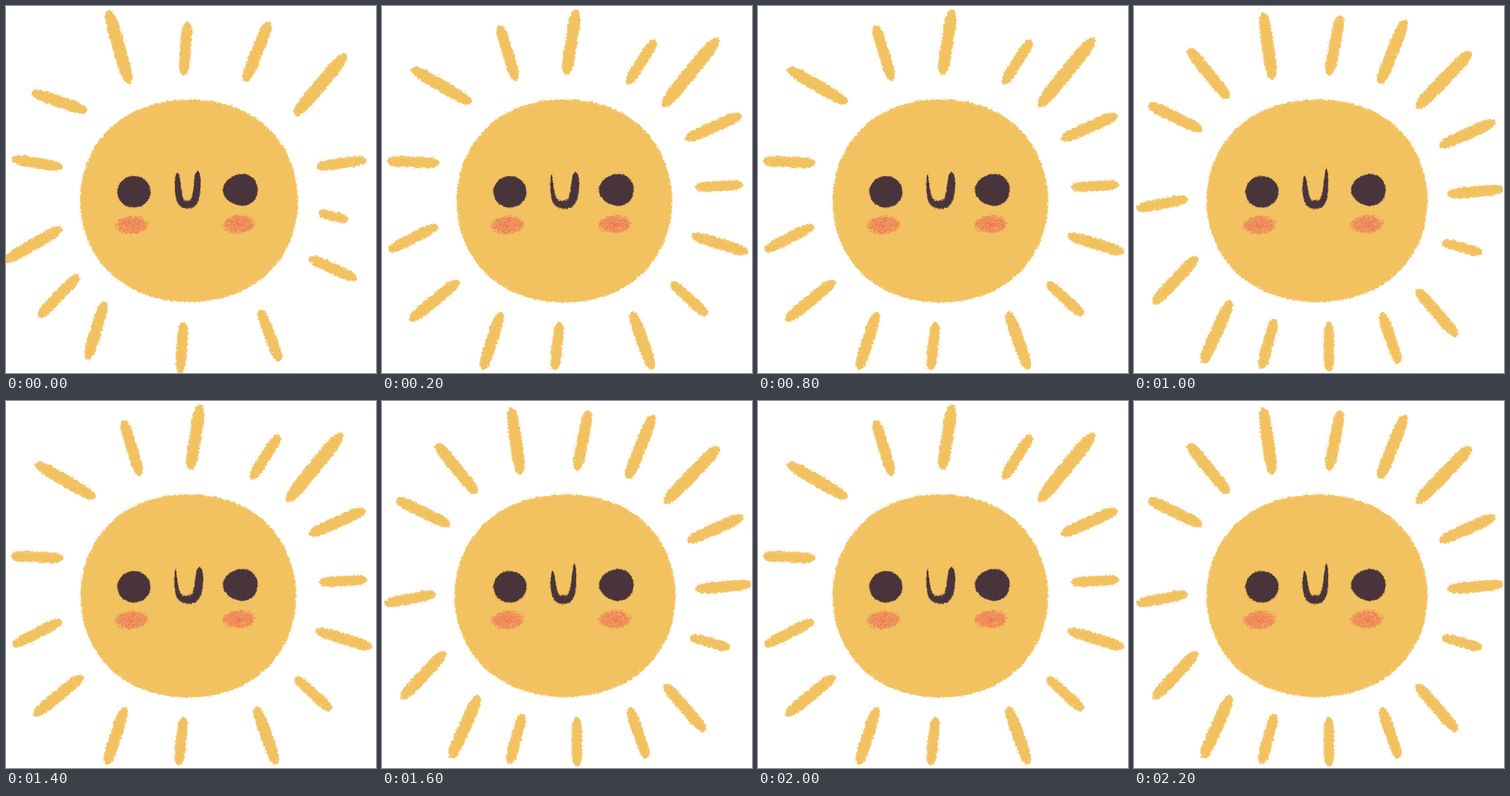
An HTML page with a canvas that plays this animation: 480 px wide and 476 px high, repeating every 2.4 s.

```html
<!DOCTYPE html>
<html lang="en">
<head>
<meta charset="utf-8">
<title>Wobbly sun</title>
<style>
html, body { margin: 0; width: 100%; height: 100%; overflow: hidden; background: #fff; }
canvas { display: block; width: 100vw; height: 100vh; }
</style>
</head>
<body>
<canvas id="stage" width="480" height="476"></canvas>
<script>
const W = 480, H = 476, CX = 236, CY = 250, HOLD = 200;
const PAPER = '#fff', YELLOW = '#f2c260', DARK = '#48343a', CORAL = '#f06c5a';
const { sin, cos, sqrt, hypot, abs, PI } = Math;
const rad = deg => deg * PI / 180;

let seed = 7;
function rand() {
  seed = (seed * 1664525 + 1013904223) % 4294967296;
  return seed / 4294967296;
}
const spread = a => (rand() * 2 - 1) * a;

// n + 1 points of a path given as a function of 0..1
const sample = (n, path) => Array.from({ length: n + 1 }, (_, i) => path(i / n));

// Fill an outline with a crumbly crayon edge
function crayon(g, edge, color, under, amp) {
  g.fillStyle = color;
  g.beginPath();
  for (const [x, y] of edge) g.lineTo(x + spread(amp), y + spread(amp));
  g.fill();
  for (const [x, y] of edge) {
    g.fillStyle = rand() < 0.5 ? color : under;
    g.globalAlpha = 0.3 + rand() * 0.5;
    g.fillRect(x + spread(amp * 2) - 0.5, y + spread(amp * 2) - 0.5, 1, 1);
  }
  g.globalAlpha = 1;
}

// Stroke along path(t) = [x, y, width]; a higher cap gives blunter ends
function brush(g, n, path, cap, color, under, amp) {
  const left = [], right = [];
  sample(n, t => {
    const [x, y, w] = path(t), [x2, y2] = path(t + 0.001), [x1, y1] = path(t - 0.001);
    const len = hypot(x2 - x1, y2 - y1);
    const h = w / 2 * sqrt(1 - abs(2 * t - 1) ** cap);
    const nx = (y1 - y2) / len * h, ny = (x2 - x1) / len * h;
    left.push([x + nx, y + ny]);
    right.unshift([x - nx, y - ny]);
  });
  crayon(g, left.concat(right), color, under, amp);
}

// Rays start on a ring around the disc; longer ones are drawn thicker
function ray(g, at, dir, len) {
  const a = rad(at), d = rad(dir);
  const r = 169 + 2 * cos(a) + 4 * cos(2 * a) - 5 * cos(4 * a);
  const path = t => [
    CX + r * cos(a) + t * len * cos(d),
    CY + r * sin(a) + t * len * sin(d),
    8.5 + len * 0.08
  ];
  brush(g, Math.round(len), path, 5, YELLOW, PAPER, 1.2);
}

function disc(g, size, stretch, lean) {
  const edge = sample(800, t => {
    const a = t * 2 * PI;
    const r = size + stretch * cos(2 * a) + 3 * cos(a - rad(lean)) - 1.2 * cos(4 * a);
    return [CX + r * cos(a), CY + r * sin(a)];
  });
  crayon(g, edge, YELLOW, PAPER, 1.1);
}

// Oval, optionally fuller on its right side
const oval = (cx, cy, rx, ry, egg = 0) => sample(120, t => {
  const a = t * 2 * PI;
  return [cx + rx * cos(a), cy + ry * sin(a) * (1 + egg * cos(a))];
});

// U-shaped smile with its own height and thickness at each tip
function smile(g, { half, leftTop, rightTop, thick: [w0, w1, w2] }) {
  const low = 257.5;
  const path = t => {
    const u = 2 * t - 1, side = abs(u);
    const top = u < 0 ? leftTop : rightTop;
    return [
      235.5 + half * sin(u * PI / 2),
      low - (low - top) * side ** 3,
      w1 + ((u < 0 ? w0 : w2) - w1) * side
    ];
  };
  brush(g, 100, path, 14, DARK, YELLOW, 0.4);
}

function cheek(g, cx, cy) {
  const rx = 22, ry = 12.5, tilt = -0.08;
  g.fillStyle = CORAL;
  g.globalAlpha = 0.5;
  g.beginPath();
  for (const [x, y] of oval(cx, cy, rx - 3, ry - 2)) g.lineTo(x + spread(2), y + spread(1.5));
  g.fill();
  for (let i = 0; i < 600; i++) {
    const a = rand() * 2 * PI, r = rand() ** 0.6;
    const x = r * rx * cos(a), y = r * ry * sin(a);
    g.fillStyle = rand() < 0.85 - r * 0.25 ? CORAL : YELLOW;
    g.globalAlpha = 0.25 + rand() * 0.35;
    g.fillRect(cx + x - 0.8, cy + y + x * tilt - 0.5, 1.6, 1);
  }
  g.globalAlpha = 1;
}

// Each ray: angle of its foot, direction, length
const poses = [
  {
    rays: [
      [-117, -106, 100], [-92, -86, 70], [-64, -68, 85], [-38, -50, 104], [-14, -8, 66],
      [6, 14, 40], [26, 24, 68], [57, 69, 72], [92, 94, 66], [129, 107, 79],
      [145, 134, 76], [167, 150, 87], [194, 190, 67], [221, 199, 77]
    ],
    disc: [137.5, 5, 60],
    smile: { half: 13, leftTop: 216, rightTop: 213, thick: [8, 10, 9] }
  },
  {
    rays: [
      [-112, -107, 75], [-89, -81, 87], [-61, -58, 68], [-43, -51, 114], [-26, -24, 80],
      [-5, -3, 63], [16, 17, 76], [38, 42, 64], [59, 70, 80], [92, 96, 63],
      [119, 108, 79], [142, 141, 82], [168, 153, 71], [196, 182, 68], [226, 210, 90]
    ],
    disc: [137, 4, 80],
    smile: { half: 15.5, leftTop: 218, rightTop: 215, thick: [3, 11, 11] }
  },
  {
    rays: [
      [-110, -98, 88], [-84, -79, 79], [-61, -68, 90], [-42, -46, 102], [-23, -24, 80],
      [-2, -5, 74], [19, 15, 54], [42, 49, 80], [60, 71, 70], [84, 90, 64],
      [109, 105, 68], [130, 114, 90], [154, 133, 85], [180, 169, 68], [211, 206, 78],
      [229, 231, 84]
    ],
    disc: [138.5, 6, 60],
    smile: { half: 14, leftTop: 220, rightTop: 210, thick: [6, 12, 5] }
  }
];

function paint(pose) {
  const c = document.createElement('canvas');
  c.width = W;
  c.height = H;
  const g = c.getContext('2d');
  g.fillStyle = PAPER;
  g.fillRect(0, 0, W, H);
  pose.rays.forEach(r => ray(g, ...r));
  disc(g, ...pose.disc);
  crayon(g, oval(166, 241, 21.5, 20.5), DARK, YELLOW, 0.4);
  crayon(g, oval(304, 238.5, 22.5, 20.5, 0.12), DARK, YELLOW, 0.4);
  smile(g, pose.smile);
  cheek(g, 163, 284);
  cheek(g, 302, 283);
  return c;
}

const cels = poses.map(paint);
const ctx = document.getElementById('stage').getContext('2d');
const start = performance.now();

function draw() {
  const t = Math.max(0, performance.now() - start);
  ctx.drawImage(cels[Math.floor(t / HOLD) % cels.length], 0, 0);
  requestAnimationFrame(draw);
}
draw();
</script>
</body>
</html>
```
